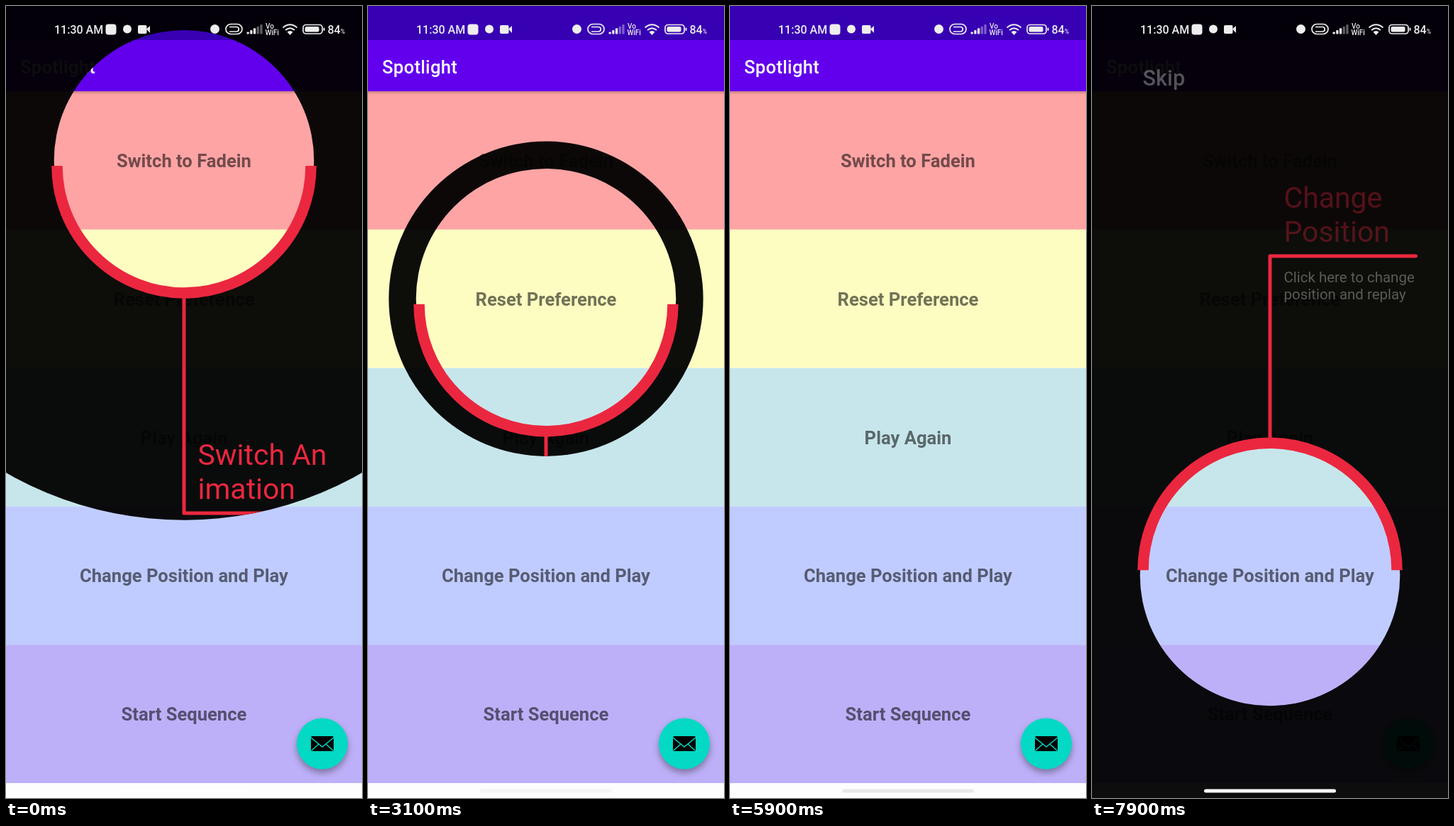
Write an HTML page that moves like this. It is 502 px wide and 1115 px high and loops after 8 s.

```html
<!DOCTYPE html>
<html lang="en">
<head>
<meta charset="utf-8">
<title>Spotlight tour</title>
<style>
  html, body { margin: 0; height: 100%; overflow: hidden; background: #fdfdfd; }
  svg { display: block; width: 100%; height: 100%; font-family: Roboto, sans-serif; }
  .row { font-size: 25.6px; font-weight: 700; text-anchor: middle; fill: #000; fill-opacity: .55; }
  .title { font-size: 25.6px; font-weight: 500; letter-spacing: .0125em; fill: #fff; }
  .head { font-size: 40.96px; fill: #eb273f; }
  .sub { font-size: 20.48px; fill: #fff; }
  .skip { font-size: 30.72px; font-weight: 500; fill: #fff; }
  .fab { filter: drop-shadow(0 5px 5px rgba(0, 0, 0, .35)); }
  .red { fill: none; stroke: #eb273f; }
  .status { font-size: 16px; font-weight: 500; fill: #eee; }
  .thin { fill: none; stroke: #eee; stroke-width: 1.7; }
</style>
</head>
<body>
<svg viewBox="0 0 502 1115">
  <defs>
    <linearGradient id="shade" x2="0" y2="1">
      <stop stop-opacity=".2"/><stop offset="1" stop-opacity="0"/>
    </linearGradient>
  </defs>
  <rect width="502" height="1115" fill="#fdfdfd"/>
  <g id="rows"></g>
  <rect y="120" width="502" height="5" fill="url(#shade)"/>
  <rect width="502" height="120" fill="#6200ee"/>
  <rect width="502" height="48" fill="#3700b3"/>
  <text class="title" x="20" y="94.5">Spotlight</text>
  <circle class="fab" cx="446" cy="1038.5" r="36" fill="#03d9c4"/>
  <rect x="430" y="1028" width="32" height="21" rx="2"/>
  <path d="M430 1030L446 1043L462 1030M431 1048L441 1039M461 1048L451 1039"
        fill="none" stroke="#03d9c4" stroke-width="1.5"/>
  <g id="overlay"></g>
  <g class="status">
    <text x="68" y="38.5">11:30 AM</text>
    <rect x="140.500" y="25.500" width="15" height="15" rx="4"/>
    <circle cx="171" cy="32.500" r="6"/>
    <rect x="186" y="27" width="12.500" height="12" rx="2"/>
    <path d="M198 32.500L203 28V38Z"/>
    <circle cx="294.500" cy="32.500" r="6.500"/>
    <rect class="thin" x="310" y="25.500" width="23" height="14" rx="7"/>
    <path class="thin" d="M315 29.500H325A3.200 3.200 0 0 1 325 36H315"/>
    <g id="bars"></g>
    <text x="366" y="31.500" font-size="10">Vo</text>
    <text x="365.500" y="41" font-size="10">WiFi</text>
    <path class="thin" stroke-width="2" d="M390.500 30.500Q400.500 22 410.500 30.500M394 34Q400.500 28.500 407 34"/>
    <path d="M396.500 36.500Q400.500 33.500 404.500 36.500L400.500 41Z"/>
    <rect class="thin" x="419" y="26.500" width="27" height="12.500" rx="4"/>
    <rect x="421.500" y="29" width="20" height="7.500" rx="2"/>
    <rect x="447.500" y="30.500" width="2" height="4.500" rx="1"/>
    <text x="453.500" y="38.500">84<tspan font-size="8.500">%</tspan></text>
  </g>
  <rect id="pill" x="158" y="1102.500" width="186" height="5" rx="2.500"/>
</svg>
<script>
const $ = id => document.getElementById(id);
const LOOP = 8000, STEP = 100, CX = 251, HOLE = 183.3, ARC = 179;
const FULL = Math.hypot(502, 1115);
const ROW_TOP = 120, ROW_H = 194.8;

const rows = [
  ['#fea4a5', 'Switch to Fadein'], ['#fdfdc1', 'Reset Preference'], ['#c7e6eb', 'Play Again'],
  ['#c0ccff', 'Change Position and Play'], ['#beb0f8', 'Start Sequence']
];

// show / hide: start times in ms; bend: height of the horizontal line
const spots = [
  { show: -2700, hide: -222, bend: 714, head: ['Switch An', 'imation'], sub: [] },
  { show: 324, hide: 2812, bend: 812, head: ['', 'Reset'], headX: 341,
    sub: ['Click here to reset', 'preferences'] },
  { show: 3367, hide: 5577, bend: 254.5, up: true, head: ['Play', 'Again'],
    sub: ['Click here to play', 'again'] },
  { show: 6123, hide: 9000, bend: 352, up: true, head: ['Change', 'Position'],
    sub: ['Click here to change', 'position and replay'] }
].map((s, i) => ({ ...s, y: ROW_TOP + ROW_H * (i + .5) }));

const clamp = x => Math.min(1, Math.max(0, x));
const smooth = x => (1 - Math.cos(Math.PI * clamp(x))) / 2;

// cubic-bezier(.4, 0, 1, 1)
function accelerate(x) {
  let lo = 0, hi = 1;
  for (let i = 0; i < 20; i++) {
    const m = (lo + hi) / 2, n = 1 - m;
    if (1.2 * n * n * m + 3 * n * m * m + m ** 3 < x) lo = m; else hi = m;
  }
  return 3 * lo * lo - 2 * lo ** 3;
}

const lines = (cls, list, x, y, gap) =>
  list.map((s, i) => `<text class="${cls}" x="${x}" y="${y + i * gap}">${s}</text>`).join('');

function drawSpot(s, t) {
  const age = t - s.show;
  const radius = FULL * (t < s.hide ? accelerate(clamp(age / 400)) : 1 - smooth((t - s.hide) / 400));
  const part = start => smooth((age - start) / 400);
  const arc = part(410), down = part(815), across = part(1220), fade = part(1625);
  const dir = s.up ? -1 : 1;
  const arcY = s.y + 7.5 * dir, from = arcY + ARC * dir;
  const bendY = from + (s.bend - from) * down;
  const ring = `M${CX - HOLE} ${s.y}a${HOLE} ${HOLE} 0 1 0 ${2 * HOLE} 0a${HOLE} ${HOLE} 0 1 0 ${-2 * HOLE} 0Z`;
  const arcPath = `M${CX - ARC * dir} ${arcY}A${ARC} ${ARC} 0 0 0 ${CX + ARC * dir} ${arcY}`;
  return `<clipPath id="reveal"><circle cx="${CX}" cy="${s.y}" r="${radius}"/></clipPath>
    <g clip-path="url(#reveal)">
      <path fill-opacity=".95" fill-rule="evenodd" d="M0 0H502V1115H0Z${ring}"/>
      ${arc ? `<path class="red" stroke-width="15.5" pathLength="1" stroke-dasharray="${arc} 2" d="${arcPath}"/>` : ''}
      ${down ? `<path class="red" stroke-width="5" stroke-linecap="round" stroke-linejoin="round"
        d="M${CX} ${from}V${bendY}${across ? 'H' + (CX + 205.5 * across) : ''}"/>` : ''}
      <g opacity="${fade}">
        ${lines('head', s.head, s.headX || 270.5, s.bend - 68.5, 48)}
        ${lines('sub', s.sub, 270.5, s.bend + 37, 24.2)}
        ${lines('skip', ['Skip'], 71.5, s.up ? 112 : 1050.5, 0)}
      </g>
    </g>`;
}

// The navigation pill darkens over the bright page, then turns white again.
function pillColor(t) {
  const age = t - spots.findLast(s => t >= s.show - 300).show;
  const dark = age < 450 ? clamp((age + 300) / 560) : 1 - clamp((age - 450) / 450);
  const v = Math.round(255 * (1 - .64 * dark));
  return `rgb(${v},${v},${v})`;
}

$('rows').innerHTML = rows.map(([color, label], i) => {
  const y = ROW_TOP + i * ROW_H;
  return `<rect y="${y}" width="502" height="${ROW_H}" fill="${color}"/>
    <text class="row" x="${CX}" y="${y + ROW_H / 2 + 9.5}">${label}</text>`;
}).join('');
$('bars').innerHTML = [0, 1, 2, 3, 4].map(i =>
  `<rect x="${339.5 + i * 4.7}" y="${36.5 - i * 2.6}" width="3.300" height="${3 + i * 2.6}" rx="1"
    opacity="${i < 3 ? 1 : .4}"/>`).join('');

let last = -1;
function frame(now) {
  const t = Math.floor(now % LOOP / STEP) * STEP;
  if (t !== last) {
    last = t;
    const spot = spots.find(s => t >= s.show && t < s.hide + 400);
    $('overlay').innerHTML = spot ? drawSpot(spot, t) : '';
    $('pill').setAttribute('fill', pillColor(t));
  }
  requestAnimationFrame(frame);
}
frame(0);
</script>
</body>
</html>
```
